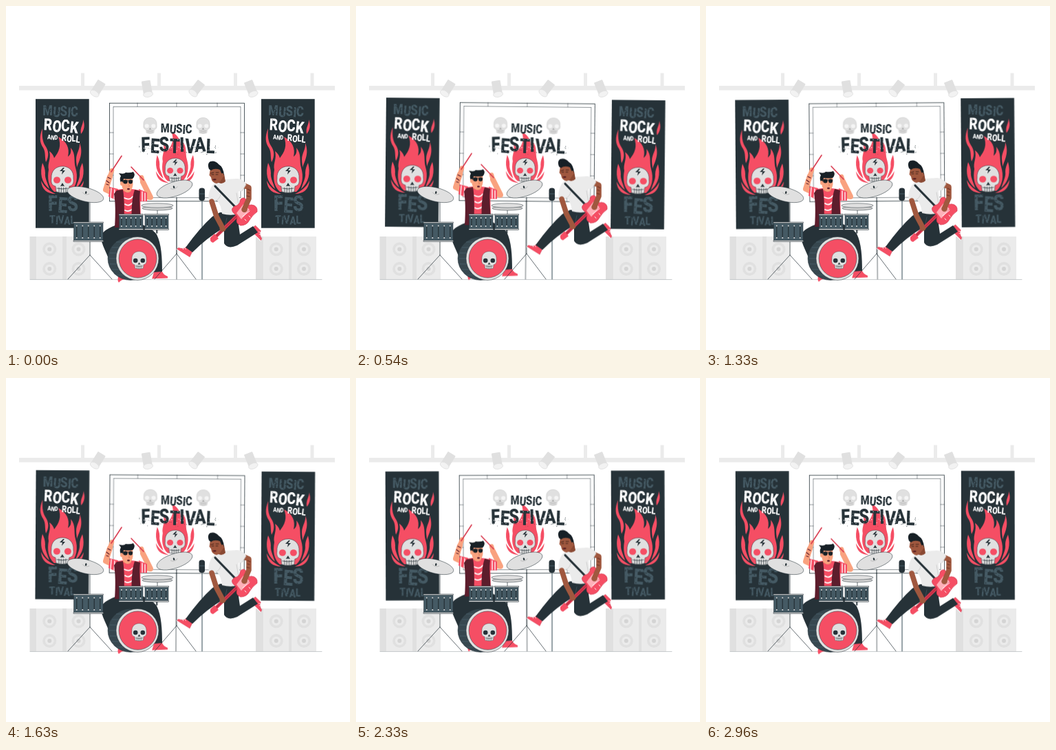
An HTML page for the animation above (3000 ms loop, 500x500 px).

```html
<!DOCTYPE html>
<html lang="en">
<head>
<meta charset="utf-8">
<title>Music festival</title>
<style>
  html, body { margin: 0; width: 100%; height: 100%; overflow: hidden; background: #fff; }
  svg { display: block; width: 100%; height: 100%; }
  text { font-family: Roboto, "Liberation Sans", sans-serif; font-weight: 900; text-anchor: middle; }
  #cloth { transform-origin: 245.5px 229px; }
</style>
</head>
<body>
<svg id="stage" viewBox="0 0 500 500" xmlns="http://www.w3.org/2000/svg"></svg>
<script>
const DARK = '#263238', STEEL = '#455a64', PINK = '#f54e64', GREY = '#e0e0e0', PALE = '#ebebeb';
const SKIN = '#f9a27f', BROWN = '#a0583f', MAROON = '#5c1d2c', WHITE = '#fff', INK = '#172026';

let seed = 7;
const rnd = () => (seed = seed * 16807 % 2147483647) / 2147483647;

const path = (d, fill, extra = '') => `<path d="${d}" fill="${fill}" ${extra}/>`;
const line = (d, color = DARK, w = .7) =>
  `<path d="${d}" fill="none" stroke="${color}" stroke-width="${w}" stroke-linecap="round" stroke-linejoin="round"/>`;
const rect = (x, y, w, h, fill, extra = '') =>
  `<rect x="${x}" y="${y}" width="${w}" height="${h}" fill="${fill}" ${extra}/>`;
const oval = (x, y, rx, ry, fill, extra = '') =>
  `<ellipse cx="${x}" cy="${y}" rx="${rx}" ry="${ry}" fill="${fill}" ${extra}/>`;
const group = (transform, body) => `<g transform="${transform}">${body}</g>`;
const edge = `stroke="${DARK}" stroke-width=".5"`;

// Tall display lettering with uneven letters
function word(s, x, y, size, fill, tilt = 0) {
  const spin = [...s].map((_, i) => [-2, 3, -3, 2][i % 4]).join(' ');
  const hop = [...s].map((_, i) => i ? [-.05, .05][i % 2] * size : 0).join(' ');
  return group(`translate(${x} ${y}) rotate(${tilt}) scale(1 1.25)`,
    `<text font-size="${size}" fill="${fill}" rotate="${spin}" dy="${hop}">${s}</text>`);
}

function specks(x, y, w, h, n, fill, max = .8) {
  let d = '';
  for (let i = 0; i < n; i++) {
    const r = .2 + rnd() * max;
    d += `M${(x + rnd() * w).toFixed(1)} ${(y + rnd() * h).toFixed(1)}l${r.toFixed(1)} ${(-r).toFixed(1)} ${r.toFixed(1)} ${r.toFixed(1)} ${(-r).toFixed(1)} ${r.toFixed(1)}z`;
  }
  return path(d, fill);
}

// Skull centred on 0,0, about 33 wide and 38 high
function skull(bone, eye, ink, bolt) {
  return path('M-16 1C-17 -11 -9 -17 0 -17S17 -11 16 1C17 7 15 11 10 12L9 20Q0 23-9 20L-10 12C-15 11-17 7-16 1Z', bone,
      `stroke="${ink}" stroke-width=".5"`) +
    oval(-8, 3, 5, 4.8, eye) + oval(8, 3, 5, 4.8, eye) +
    path('M0 7L-3 12Q0 11 3 12Z', ink) +
    line('M-8 15Q0 17 8 15M-5 14V20M-1.7 14V21M1.7 14V21M5 14V20', ink, .7) +
    (bolt ? path('M1-15L-4-10H0L-1-5 4-11H0L3-15Z', DARK) : '');
}

// Fire and skull in the coordinates of the left banner
function fire() {
  return path('M70 270C61 262 60 250 62 238C60 228 66 222 63 211C67 214 69 217 70 221C77 212 81 203 76 190C88 197 93 206 90 219C94 216 95 212 94 206C102 215 98 225 101 235C105 248 103 262 94 270Z', PINK) +
    path('M53 228C49 243 51 256 63 266C61 258 56 250 57 243C57 237 55 232 53 228ZM111 228C115 243 112 256 101 266C103 258 108 250 107 243C107 237 109 232 111 228Z', PINK) +
    path('M51 254C52 267 60 273 72 273C63 269 56 264 51 254ZM113 254C112 267 104 273 92 273C101 269 108 264 113 254Z', PINK) +
    group('translate(82 250)', skull(GREY, PINK, DARK, true));
}

const sparks = () => path('M53 178C48 190 49 199 54 206C58 213 56 219 58 227C63 218 62 210 57 203C53 197 52 188 53 178Z', PINK) +
  path('M107 199C108 208 102 214 102 223C102 228 103 231 103 235C106 225 113 215 107 199Z', PINK) +
  path('M112 165C113 172 107 176 109 186C114 180 115 173 112 165Z', PINK);

function banner(dx) {
  return group(`translate(${dx} 0)`,
    rect(43, 135.2, 77.7, 187.5, DARK) +
    word('MUSIC', 79, 160, 16.5, STEEL, 2) +
    word('FES', 83, 298.5, 25.5, STEEL, 1) +
    word('TIVAL', 82, 316.5, 13.5, STEEL, 1) +
    specks(54, 145, 52, 18, 90, DARK) + specks(60, 275, 46, 42, 130, DARK) +
    sparks() + fire() +
    word('ROCK', 79.5, 182, 19, WHITE, 4) +
    word('AND', 67.5, 194, 7.5, WHITE, 4) +
    word('ROLL', 94, 197, 11, WHITE, 4) +
    specks(56, 165, 48, 18, 24, DARK, .5));
}

function backdrop() {
  const ticks = [191, 248, 307].map(x => `M${x} 141V146M${x} 279V284`).join('') +
    [184, 215, 246].map(y => `M150.5 ${y}H156M341 ${y}H346.5`).join('');
  const small = x => group(`translate(${x} 172.5) scale(.6)`, skull(GREY, '#f5f5f5', '#a6a6a6'));
  return rect(150.5, 141.2, 196, 142.6, WHITE, `stroke="${DARK}" stroke-width=".8"`) +
    rect(156, 146.4, 185, 132.4, 'none', `stroke="${DARK}" stroke-width=".5"`) +
    line(ticks, DARK, .5) + line('M248 283.5V397') +
    small(209.5) + small(286.5) +
    group('translate(172 11.5) scale(.9)', fire()) +
    word('MUSIC', 247.5, 184.5, 14.6, DARK, 2) +
    word('FESTIVAL', 250, 212, 23.7, DARK, .3) +
    specks(197, 190, 108, 22, 70, WHITE, .6) + specks(193, 203, 116, 13, 80, DARK, .5) +
    specks(225, 171, 45, 14, 24, WHITE, .5);
}

function truss() {
  const lamp = (x, y, a) => group(`translate(${x} ${y}) rotate(${a})`,
    rect(-6.5, -11, 13, 20, GREY, 'rx="1"') + oval(0, 9, 7, 4, '#f2f2f2', `stroke="${GREY}" stroke-width=".8"`));
  return [109, 220, 331, 442.5].map(x => rect(x, 97.5, 5, 19, PALE)).join('') +
    rect(19, 116, 459, 6.5, PALE) +
    lamp(133.5, 119.5, 32) + lamp(205, 119.5, -10) + lamp(277.5, 119.5, 38) + lamp(356, 119.5, -22);
}

function speakers() {
  const cone = (x, y) => oval(x, y, 10, 10, GREY) + oval(x, y, 6.3, 6.3, PALE) + oval(x, y, 3, 3, '#d4d4d4');
  const box = (x, side, w) => rect(x, 335, side, 62.5, GREY) + rect(x + side, 335, w - side, 62.5, PALE) +
    cone(x + side + (w - side) / 2, 353.5) + cone(x + side + (w - side) / 2, 382);
  return box(82, 6, 41) + box(34.5, 10, 47.5) + box(411, 4, 40) + box(363, 11.5, 48);
}

function drummer() {
  const stripes = 'M172 279Q180 283 184 277M173 288Q178 292 184 286M173 297Q179 300 184 295';
  return path('M166 316C150 322 137 328 138 338C140 350 152 370 158 390L172 392L176 350L206 346C210 360 214 374 215 388L227 388C227 366 226 346 219 332C214 325 204 320 194 316Z', DARK) +
    path('M164 391L175 391L173 397Q167 398 164 402Q161 399 164 391Z', PINK) +
    path('M215 387L227 386Q229 391 235 393L235 396L212 397Z', PINK) + line('M212 397L235 396', WHITE, 1) +
    // Arms
    line('M160 274L145 267L151 248', SKIN, 8) + line('M151 248L154 239', SKIN, 6.5) +
    line('M194 275L210 278L199 256', SKIN, 8) + line('M199 256L197 249', SKIN, 6.5) +
    line('M146 254L150 257M148 249L152 251M146 259L149 260', MAROON, 1.2) +
    line('M153 241L168 218', '#d93a4f', 1.6) + line('M200 253L182 234', '#d93a4f', 1.6) +
    path('M163 266L151 263L149 277L162 283ZM193 266L205 271L205 284L194 284Z', PINK) +
    line('M153 265L152 278M158 267L157 280M198 270L198 283M202 272L202 283', WHITE, 1.3) +
    // Torso
    path('M162 267Q177 264 195 268L196 318H161Z', PINK) + line(stripes, WHITE, 1.8) +
    path('M161 268L170 267Q173 285 171 322H158Q160 290 157 273ZM187 267L195 269Q193 285 197 322H183Q181 285 187 267Z', MAROON) +
    path('M170 260H182V269Q177 274 170 268Z', '#ee8e6b') +
    // Head
    path('M168 248Q176 243 184 248L184.5 260Q183 270 176.5 271Q169 269 168 259Z', SKIN) +
    path('M168 259Q164 252 167 247L164 243Q172 245 174 242Q181 243 185 241Q189 246 184 251Q177 252 171 251L170 258Z', INK) +
    oval(168, 258, 2, 3, SKIN) +
    oval(173.5, 255.5, 3.2, 3, INK) + oval(181, 255.5, 3, 3, INK) +
    line('M169 254H184', INK, 1) + line('M178 259L180 262H178', '#d97a58', .8) +
    oval(178, 266, 2, 1.2, MAROON);
}

function tom(x, y, w, h) {
  let s = rect(x, y, w, h, STEEL, edge);
  const n = 5, step = w / n;
  for (let i = 0; i < n; i++) {
    const cx = x + step * (i + .5);
    s += line(`M${cx} ${y + 5}V${y + h - 5}`, DARK, 1.3) + oval(cx, y + 5, 1, 1, GREY) + oval(cx, y + h - 5, 1, 1, GREY);
  }
  return s + rect(x - .5, y - .5, w + 1, 1.6, GREY, edge) + rect(x - .5, y + h - 1.2, w + 1, 1.6, GREY, edge);
}

function cymbal(x, y, rx, ry, a) {
  return group(`translate(${x} ${y}) rotate(${a})`, oval(0, 0, rx, ry, GREY, edge) +
    line('M-5-2Q0 2 5-2', '#a6a6a6', .6) + oval(0, -3, 1.2, 2, DARK));
}

function drums() {
  let hoops = '';
  for (let i = 0; i < 7; i++) {
    const y = 343 + i * 8, x = 150 + (y - 367) ** 2 / 55;
    hoops += `M${x} ${y}h12`;
  }
  return line('M122 285V362M122 362L90 397M122 362L154 397M248 278V360M248 360L216 397M248 360L276 397M220 297V330') +
    tom(98.5, 314.5, 42.5, 27.5) +
    oval(181, 367, 33, 31.5, '#37474f', edge) + line(hoops, STEEL, 1.2) +
    oval(191, 367, 31, 31.5, GREY, edge) + oval(191.5, 367, 27.5, 28, PINK, edge) +
    group('translate(193.5 368) scale(.66)', skull(GREY, DARK, DARK)) +
    line('M182 325V336M219 325V330', DARK, 1.5) +
    tom(164.5, 303, 34.5, 22) + tom(202, 303, 34, 22) +
    oval(220, 294, 22, 3, '#cfcfcf', edge) + oval(220, 290, 23, 3.2, GREY, edge) +
    cymbal(115.5, 274, 27, 10, 14) + cymbal(245, 266, 27, 10.5, -18);
}

const mic = () => line('M285 283V397', STEEL, 1.1) + rect(280.5, 264.5, 8.5, 18.5, DARK, 'rx="3.5"') + line('M281 273H288.5', STEEL, 1);

function shoe(x, y, a, flip) {
  return group(`translate(${x} ${y}) rotate(${a}) scale(${flip} 1)`,
    path('M-6-6L5-6Q6-1 14 1L15 4H-7Z', PINK, 'stroke="#c9354b" stroke-width=".5"') +
    line('M-7 4.3H15', WHITE, 1) + line('M4-3L7-4M7-1L9-3', WHITE, .8));
}

function guitarist() {
  return shoe(263, 358, 32, -1) + shoe(362.5, 327.5, 45, 1) +
    // Legs
    path('M311 300L343 300Q344 312 338 318L340 332L359 320L366 329L336 348Q322 354 317 345L317 322Q292 337 271 358L261 351Q282 322 300 306Z', DARK) +
    line('M318 322L321 308', STEEL, .7) +
    // Shirt
    path('M297 266Q302 254 318 252L336 251Q345 253 346 262L338 270Q340 290 343 301Q328 306 314 302Q313 290 307 283L295 285Q293 274 297 266Z', PALE) +
    line('M335 272Q337 285 340 298M305 283Q311 280 312 274', '#c9c9c9', .8) +
    // Head
    path('M306 244H317L319 255Q313 261 306 255Z', '#8a4933') +
    path('M297 236Q304 232 314 236L316 247Q312 257 306 258Q299 257 298 249L295.5 246Z', BROWN) +
    path('M295 237Q292 229 297 226Q304 224 309 230Q316 234 317 246L313.5 244L311 238Q303 235 298 239Z', INK) +
    oval(314.5, 246, 2, 3, BROWN) + line('M298 243L302 242M305 242L309 242M299 245H302M305 245H308', '#321a14', .8) +
    path('M300 252Q304 250 306 252Q303 255 300 252Z', '#5b1f22') +
    line('M304 262L334 293', DARK, 3.2) +
    // Guitar
    line('M302 338L342 299', '#d9374e', 4.6) + line('M302 338L342 299', '#8f2435', .8) +
    path('M297 337L303 331L309 338L301 344Q296 343 297 337Z', PINK) +
    path('M332 302Q325 296 332 291Q340 290 341 281Q346 276 350 283Q350 291 357 289Q366 290 365 299Q358 304 354 311Q350 319 341 319Q333 316 336 308Q337 305 332 302Z', PINK, 'stroke="#d9374e" stroke-width=".8"') +
    path('M335 301L345 288L354 296L342 310Z', '#ffb0b8') + line('M344 306L354 298M347 310L349 312M353 305L355 307', WHITE, 1) +
    // Arms
    line('M299 284L306 306L314 321', BROWN, 7.5) + oval(315, 324, 4.5, 4, BROWN) +
    line('M342 259L353 264L353 280L347 294', BROWN, 7.5) + oval(346.5, 296, 4.3, 4, BROWN) +
    line('M351 266L355 268M351 271L354 272M350 276L354 277', '#6d3526', 1.1) +
    path('M333 251Q344 250 349 259L343 269Q337 270 335 265Z', PALE) + line('M349 260L343 269', '#c9c9c9', .8);
}

document.getElementById('stage').innerHTML =
  truss() + speakers() + line('M35 397.6H459', '#8f979b', .5) +
  `<g id="cloth">${backdrop()}${banner(0)}${banner(328)}</g>` +
  `<g class="jump">${drummer()}</g>` + drums() + mic() +
  `<g class="jump">${guitarist()}</g>`;

const loop = { duration: 1500, iterations: Infinity, easing: 'linear' };
const turns = [[0, 0], [.25, 1], [.75, -1], [1, 0]];
document.getElementById('cloth').animate(
  turns.map(([offset, a]) => ({ offset, transform: `rotate(${a}deg)` })), loop);
document.querySelectorAll('.jump').forEach(el => el.animate(
  [0, -5, 0].map(y => ({ transform: `translateY(${y}px)` })), loop));
</script>
</body>
</html>
```
